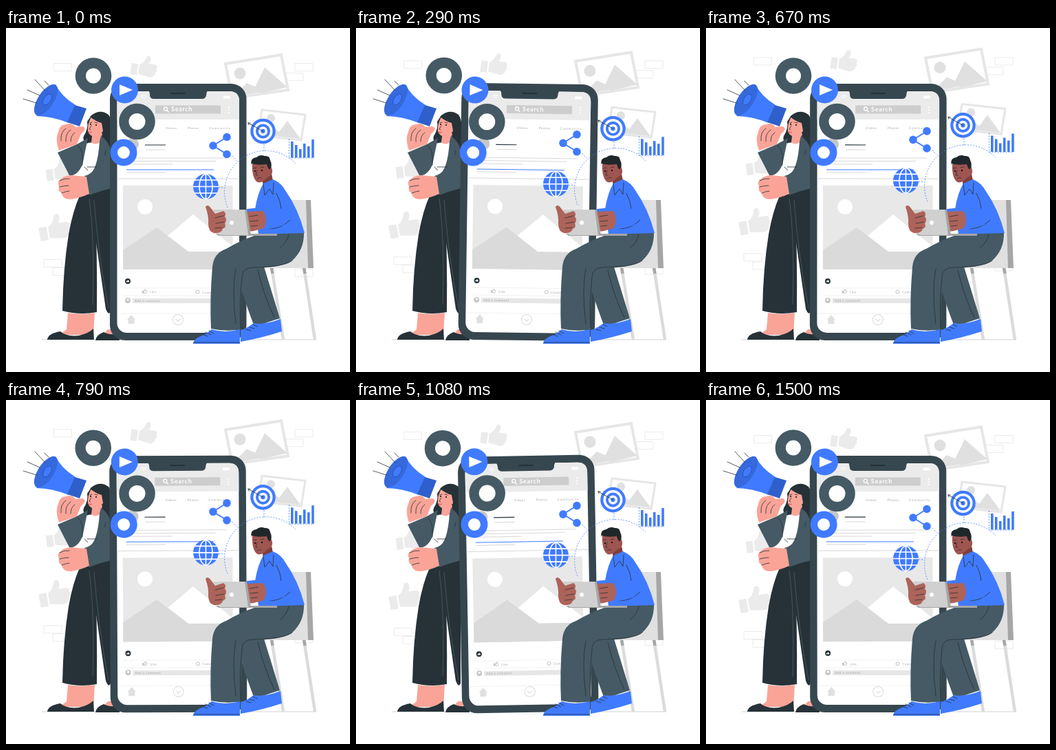
These frames come from a looping animation (500 by 500 pixels, 1540 ms). An HTML page:

```html
<!DOCTYPE html>
<html lang="en">
<head>
<meta charset="utf-8">
<title>Social media</title>
<style>
html, body { margin: 0; width: 100%; height: 100%; overflow: hidden; background: #fff; }
svg { display: block; width: 100%; height: 100%; }
text { font-family: Lato, sans-serif; }
.ink { fill: none; stroke: #263238; stroke-linecap: round; stroke-linejoin: round; stroke-width: .8; }
.wire { fill: none; stroke: #407bff; stroke-width: .8; stroke-dasharray: 2 2; }
.white { fill: none; stroke: #fff; }
.tiny { font-size: 4.6px; letter-spacing: .45px; fill: #a6a6a6; }
.dark { fill: #263238; } .slate { fill: #455a64; } .blue { fill: #407bff; }
.pink { fill: #faa498; } .brown { fill: #ad6359; }
</style>
</head>
<body>
<svg viewBox="0 0 500 500">
  <defs>
    <path id="thumb" d="M0 14h10v17h-10zM12 15Q19 12 22 1Q29-2 28 7L26 12H36Q41 14 38 18Q41 21 37 24Q38 28 35 29Q34 32 29 32L12 29z"/>
    <path id="brick" d="M0 0h26v11h-26z" fill="#fff" stroke="#ebebeb"/>
  </defs>

  <g id="scenery">
    <use href="#brick" x="69.500" y="51.500"/><use href="#brick" x="420" y="51.500"/>
    <use href="#brick" x="406" y="65.500"/><use href="#brick" x="55" y="336.500"/>
    <use href="#brick" x="68" y="348.500"/><use href="#brick" x="420" y="350.500"/>
    <g fill="#ebebeb">
      <use href="#thumb" transform="translate(184 37.500) rotate(7) scale(.97)"/>
      <use href="#thumb" transform="translate(56 192) rotate(-7)"/>
      <use href="#thumb" transform="translate(44.500 275) rotate(-10) scale(1.15)"/>
    </g>
    <g fill="#fff" stroke="#e6e6e6" stroke-width="4">
      <path d="M319 52L400 39L410 90L329 102z"/>
      <path d="M372 119L435 126L429 163L366 156z" stroke-width="3"/>
    </g>
    <g fill="#e0e0e0">
      <circle cx="340" cy="66" r="8.500"/>
      <path d="M331 99L350 80L378 92L330 100zM361 88L376 57L409 86L370 95z"/>
      <circle cx="385" cy="131" r="6"/>
      <path d="M372 155L384 141L397 151L409 135L428 161z"/>
    </g>
  </g>

  <path d="M52 453H451" stroke="#c7c7c7" stroke-width=".8"/>

  <g id="chair">
    <path d="M386 348L403 453M433 348L449 453" stroke="#dbdbdb" stroke-width="4.500"/>
    <path d="M386 348L387.500 357M433 348L434.500 357" stroke="#a6a6a6" stroke-width="4.500"/>
    <path d="M383 250H438L445 349H383z" fill="#e0e0e0"/>
    <path d="M436 250H443L447 349H439z" fill="#a6a6a6"/>
  </g>

  <g id="woman">
    <path class="pink" d="M138 449L148 438H165V450z"/>
    <path class="dark" d="M130 454Q131 446 142 442Q150 447 165 444V454z"/>
    <path class="dark" d="M124 127Q137 117 149 126Q156 136 153 160Q156 176 149 190L119 168Q110 164 113 157Q120 146 118 136z"/>
    <path fill="#fff" d="M119 167L136 165L136 205L118 212L110 202z"/>
    <path class="pink" d="M126 150L140 153L138 164Q131 172 124 166z"/>
    <path class="pink" d="M124 129Q118 140 119 150Q122 159 132 157Q144 152 144 138Q138 137 134 128z"/>
    <path class="dark" d="M122 129Q131 136 139 138L142 155Q151 144 147 130Q136 117 122 129z"/>
    <path class="ink" d="M122 138l3-1M129 137l4 1M124 142l-3 5 2 1" stroke-width=".7"/>
    <path d="M120 151q3 2 5 0" stroke="#d44" fill="none"/>
    <circle cx="123" cy="140" r="1"/><circle cx="131" cy="141" r="1"/>

    <path class="dark" d="M124 238L152 231V412Q149 419 145 408L131 312z"/>
    <path class="dark" d="M107 244L129 236Q133 330 132 413Q107 418 82 411Q83 350 91 300Q97 266 107 244z"/>
    <path d="M128 250Q134 330 149 407M121 248Q129 310 126 402" fill="none" stroke="#52646c" stroke-width=".7"/>
    <path class="pink" d="M90 414Q109 417 129 414L127 446H76Q84 442 88 438z"/>
    <path class="dark" d="M60 453Q61 444 79 441Q88 449 106 447Q120 444 127 437L128 453z"/>

    <path class="slate" d="M138 157Q152 166 153 185V233L119 242L120 213Q133 208 136 165z"/>
    <path class="slate" d="M75 181L103 169L119 160L111 199Q103 216 92 214z"/>
    <path class="ink" d="M104 171Q113 176 111 199M124 218Q140 209 145 178M119 207L114 202M118 202h17"/>
    <path class="slate" d="M114 215Q132 211 141 183L153 190V231L121 243z"/>
    <path class="pink" d="M117 216L94 214Q83 215 78 221Q74 224 77 230Q75 237 81 240Q82 249 94 249Q108 247 121 241z"/>
    <path class="ink" d="M78 222q7-4 14-3M78 231q7-2 13-2M81 240q7-3 11-3"/>

    <path class="blue" d="M72 82Q80 99 101 112L91 138Q66 128 44 128z"/>
    <path d="M100 112L117 117L107 143L89 137z" fill="#2f5fcb"/>
    <ellipse cx="58" cy="104.500" rx="26" ry="11.500" transform="rotate(-57 58 104.500)" fill="#3569dc"/>
    <ellipse cx="60" cy="104" rx="9" ry="5" transform="rotate(-57 60 104)" fill="#407bff" stroke="#2850ad" stroke-width=".8"/>
    <path class="ink" d="M42 75L57 91M56 77L62 83M31 90L49 98M25 103L44 109"/>
    <path class="pink" d="M77 178Q71 162 76 151Q78 140 88 140Q95 137 101 144L111 143Q119 146 109 154L103 169z"/>
    <path class="ink" d="M80 164q-1-13 7-18M87 165q-1-12 7-17M94 165q0-9 6-13"/>
  </g>

  <g id="phone">
    <rect x="151" y="81" width="198.500" height="373" rx="22" fill="#37474f"/>
    <rect x="161.500" y="92" width="177.500" height="351" rx="14" fill="#fff"/>
    <path d="M161.500 133V106Q161.500 92 176 92H325Q339 92 339 106V133z" fill="#ebebeb"/>
    <path d="M207 91H293Q291 94 291 98Q290 103 285 103H215Q209 103 209 97Q209 93 207 91z" fill="#37474f"/>
    <path d="M240 95H260" stroke="#263238" stroke-width="2" stroke-linecap="round"/>
    <rect x="217" y="112.500" width="95" height="12" fill="#cdcdcd"/>
    <g class="white" stroke-width="1.300">
      <circle cx="232" cy="117.500" r="2.500"/><path d="M234 119.500l2.500 3"/>
      <path d="M196 100q4-4 8 0M198 102q2-2 4 0" stroke-width="1"/>
    </g>
    <rect x="316" y="98.500" width="10" height="4" rx="1" fill="#fff"/>
    <path d="M324 115v9" stroke="#fff" stroke-width="2.200" stroke-linecap="round" stroke-dasharray="0 4"/>
    <text x="240" y="121.200" font-size="9" font-weight="700" letter-spacing=".7" fill="#fff">Search</text>
    <g class="tiny">
      <text x="232" y="147">Videos</text><text x="264" y="147">Photos</text><text x="295" y="147" letter-spacing=".9">Community</text>
    </g>
    <circle cx="184" cy="169" r="9" fill="#c7c7c7"/>
    <path d="M202 170H232" stroke="#263238" stroke-width="1.200"/>
    <path d="M203 177H232M168 189H321M176 193.500H305M175 198H242M175 210H232M163 219H338" stroke="#c7c7c7" stroke-width=".7"/>
    <path d="M175 206H302" stroke="#407bff"/>

    <rect x="170" y="229" width="159.500" height="122" fill="#e8e8e8"/>
    <circle cx="202" cy="260" r="11" fill="#fff"/>
    <path d="M235 302L272 271L329 317V325H264z" fill="#fff"/>
    <path d="M170 323L219 290L265 325H329.500V351H170z" fill="#dadada"/>

    <circle class="dark" cx="177" cy="368" r="4"/>
    <use href="#thumb" transform="translate(174.800 366) scale(.11)" fill="#fff"/>
    <path d="M171 378H329M171 389H329M163 415H338" stroke="#ebebeb" stroke-width=".7"/>
    <use href="#thumb" transform="translate(198 380) scale(.17)" fill="none" stroke="#a6a6a6" stroke-width="4"/>
    <circle cx="278.500" cy="383.500" r="2.500" fill="none" stroke="#a6a6a6" stroke-width=".7"/>
    <g class="tiny"><text x="209" y="385.500">Like</text><text x="285" y="385.500">Comment</text></g>
    <circle cx="177" cy="396" r="4" fill="#c7c7c7"/>
    <circle cx="177" cy="395" r="1.600" fill="#fff"/>
    <rect x="184" y="393" width="140" height="7" fill="#e6e6e6"/>
    <text class="tiny" x="187" y="398">Add a comment</text>
    <path d="M176 424L182 417L188 424H186.500V430H177.500V424z" fill="#e0e0e0"/>
    <g fill="none" stroke="#dbdbdb"><circle cx="250" cy="424" r="7.500"/><path d="M246.500 423l3.500 3 3.500-3"/></g>
  </g>

  <g id="badges">
    <circle class="slate" cx="127" cy="69.500" r="26.300"/><circle cx="127" cy="69.500" r="11" fill="#fff"/>
    <circle class="blue" cx="172.500" cy="90" r="19.500"/><path d="M165 82L184 90L165 98z" fill="#fff"/>
    <circle class="slate" cx="190.500" cy="136" r="26.300"/><circle cx="190.500" cy="136" r="12" fill="#fff"/>
    <circle class="blue" cx="171" cy="181" r="19.500"/><circle cx="171" cy="181" r="9" fill="#fff"/>
  </g>

  <g id="icons">
    <path class="wire" d="M322 261A60 60 0 0 1 421 197M309 232H317M375 169V179M329 186L335 193M411.500 161V189H448"/>
    <g class="blue">
      <circle cx="321" cy="158.500" r="5.800"/><circle cx="301" cy="171" r="5.800"/><circle cx="321" cy="183.500" r="5.800"/>
      <circle cx="290.500" cy="230.500" r="18.500"/>
      <circle cx="373.500" cy="150" r="18.300"/>
    </g>
    <path d="M321 158.500L301 171L321 183.500" fill="none" stroke="#407bff" stroke-width="1.800"/>
    <g class="white" stroke-width="1.600">
      <path d="M290.500 212V249M272 230.500H309M274 221H307M274 240H307"/>
      <ellipse cx="290.500" cy="230.500" rx="9.500" ry="18"/>
    </g>
    <g class="white" stroke-width="3.500"><circle cx="373.500" cy="150" r="12.300"/><circle cx="373.500" cy="150" r="4.900"/></g>
    <path class="ink" d="M352 138L373.500 150M352 138l1 3M352 138l3 0" stroke-width=".6"/>
    <path d="M415.800 188.500V165M421.700 188.500V170M427.700 188.500V176M433.700 188.500V168M439.800 188.500V172M446 188.500V162" stroke="#407bff" stroke-width="3.600"/>
  </g>

  <g id="man">
    <path class="slate" d="M342 349L374 344Q384 376 398 422L361 434Q350 405 342 380z"/>
    <path class="blue" d="M341 456V439Q348 438 360 429Q375 432 399 423L401 441Q370 451 341 456z"/>
    <path class="slate" d="M366 300L433 296Q434 322 416 338Q405 346 378 348L346 352Q341 390 341 438Q320 442 298 437Q296 395 300 347Q302 327 320 321Q340 309 366 300z"/>
    <path class="ink" d="M416 338Q405 347 360 348Q343 348 343 362Q339 400 341 436M366 352Q375 390 390 421M411 300q-2 11-12 19M334 350Q328 380 334 430"/>
    <path class="blue" d="M272 459Q272 451 290 445L299 438Q318 444 340 438V459z"/>
    <path class="ink" d="M285 445l8 3M290 442l8 4M295 440l7 4M349 438l7 2M354 435l7 2M359 431l6 3M273 457H339"/>

    <path fill="#7d403d" d="M371 215L385 207L389 227Q383 237 374 229z"/>
    <path fill="#9f5550" d="M358 197Q357 216 364 223Q370 228 380 217Q390 213 386 203L382 193L362 190z"/>
    <path fill="#20272b" d="M357 200Q354 189 364 188Q369 183 376 186Q383 185 384 192Q388 200 383 206Q380 203 379 198Q366 200 357 197z"/>
    <path class="ink" d="M360 204l4-1M370 203l5-1M365 207l-2 7h3M365 219q4-3 6-1" stroke-width=".7"/>
    <circle cx="362" cy="208" r="1.100"/><circle cx="372" cy="207" r="1.100"/>
    <path class="blue" d="M374 226L388 220Q400 225 406 236Q425 263 434 298L367 300L362 263Q366 239 374 226z"/>
    <path class="ink" d="M374 227L376 243L383 234L388 242L389 225M393 240Q399 251 400 262L377 265M382 292Q400 292 413 279"/>
    <path class="brown" d="M349 266L374 263Q382 275 375 291L360 295Q348 298 349 280z"/>
    <path class="blue" d="M350 263L398 258L405 286L376 294Q381 276 374 266L350 267z"/>
    <path d="M305 299H394V302H309z" fill="#a6a6a6"/>
    <path d="M301 264H348L354 301H310z" fill="#d0d0d0"/>
    <path d="M347 264H350L356 301H352z" fill="#a6a6a6"/>
    <circle cx="328" cy="283" r="3" fill="#fff"/>
    <path class="brown" d="M290 260Q293 255 298 262L304 270L316 266Q321 269 318 274Q322 279 318 284Q321 289 315 292Q313 299 302 298Q294 296 294 284Q295 274 290 260z"/>
    <path class="ink" d="M304 276l12-3M305 284l12-2M304 291l10-1M354 274l12-2M355 281l11-1M356 288l9-1"/>
  </g>
</svg>
<script>
const LOOP = 1540;
const tilt = [[0, 0], [335, .92], [1090, -1.05], [LOOP, 0]];
const lift = [[0, 0], [735, -9.4], [1460, 0], [LOOP, 0]];

function valueAt(keys, t) {
  const i = keys.findIndex(([time]) => time > t);
  const [t0, v0] = keys[i - 1], [t1, v1] = keys[i];
  return v0 + (v1 - v0) * (t - t0) / (t1 - t0);
}

function move(id, transform) {
  document.getElementById(id).setAttribute('transform', transform);
}

const start = performance.now();

function draw() {
  const t = (performance.now() - start) % LOOP;
  const angle = valueAt(tilt, t), y = valueAt(lift, t);
  move('phone', `rotate(${angle} 250.500 267.500)`);
  move('badges', `rotate(${angle} 165 125)`);
  move('scenery', `translate(0 ${y})`);
  move('icons', `translate(0 ${y})`);
  requestAnimationFrame(draw);
}
draw();
</script>
</body>
</html>
```
